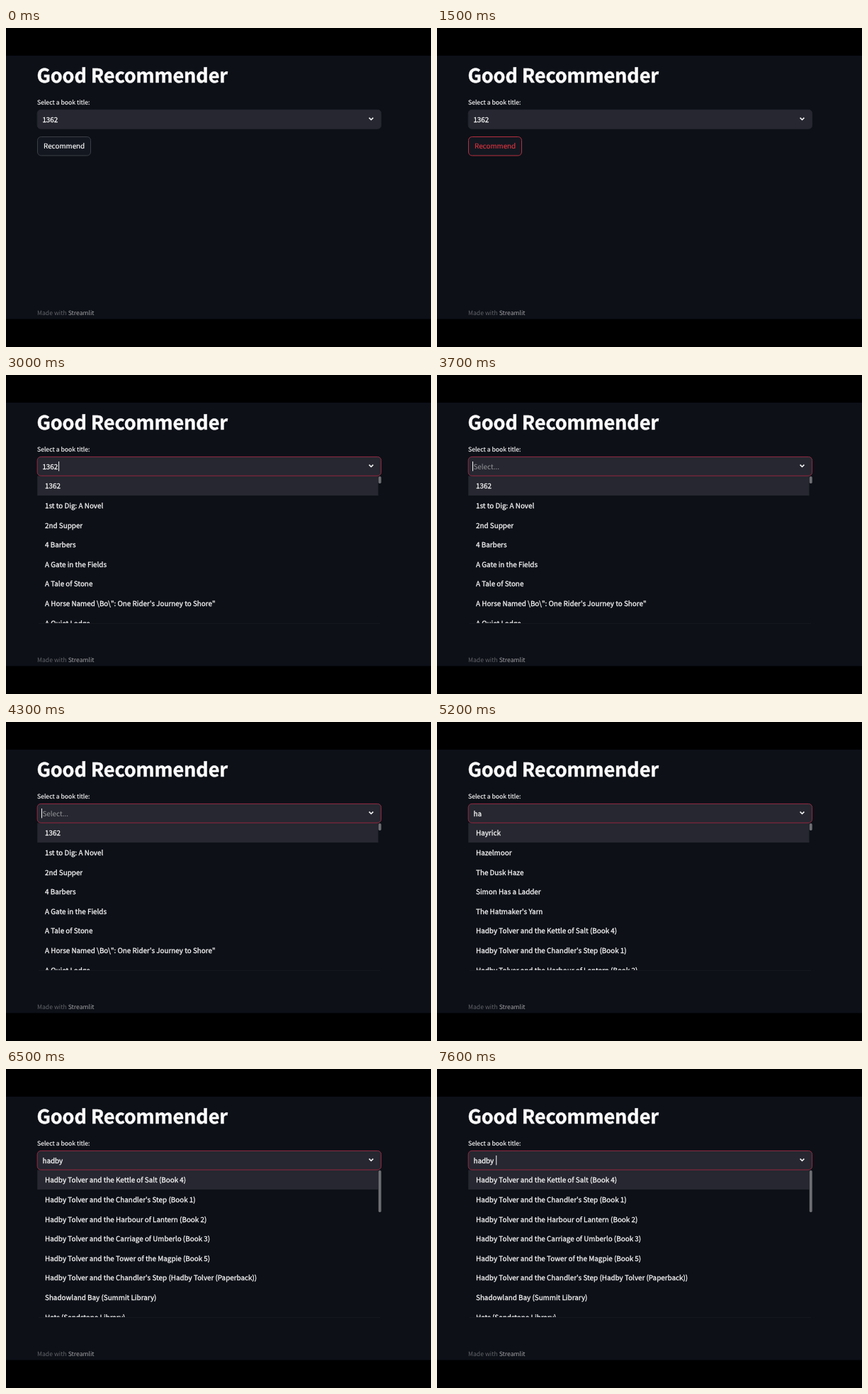
Write an HTML page that moves like this. It is 600 px wide and 450 px high and loops after 8000 ms.

```html
<!DOCTYPE html>
<html lang="en">
<head>
<meta charset="utf-8">
<title>Good Recommender</title>
<style>
  html, body { margin: 0; width: 100%; height: 100%; overflow: hidden; background: #000; }
  svg { display: block; width: 600px; height: 450px; }
  text {
    font: 400 9.87px "Noto Sans CJK JP", "Noto Sans CJK SC", "Noto Sans", sans-serif;
    fill: #fafafa; white-space: pre; text-rendering: geometricPrecision;
  }
  .title { font-size: 27.1px; font-weight: 700; letter-spacing: -.005em; stroke: #fafafa; stroke-width: .5px; }
  .small { font-size: 8.65px; }
  .strong { stroke: #fafafa; stroke-width: .28px; }
</style>
</head>
<body>
<svg viewBox="0 0 600 450">
  <defs><clipPath id="listClip"><rect x="44" y="142.5" width="486" height="207.5"/></clipPath></defs>
  <rect width="600" height="450" fill="#000"/>
  <rect y="39" width="600" height="371.5" fill="#0d1017"/>

  <g id="anchor" fill="none" stroke="#c8c9cc" stroke-width="1.2" stroke-linecap="round">
    <path d="M24 67a2.6 2.6 0 0 0 3.7 0l1.8-1.8a2.6 2.6 0 0 0-3.7-3.7l-.9.9"/>
    <path d="M26.2 65a2.6 2.6 0 0 0-3.7 0l-1.8 1.8a2.6 2.6 0 0 0 3.7 3.7l.9-.9"/>
  </g>
  <text class="title" x="43.5" y="77">Good Recommender</text>
  <text class="small" x="44" y="107.5" stroke="#fafafa" stroke-width=".15">Select a book title:</text>

  <rect id="button" x="44.5" y="153.5" width="75" height="26.5" rx="5" fill="#131720"/>
  <text id="buttonText" x="53" y="170.3" stroke-width=".2">Recommend</text>
  <text class="small" x="44" y="404.7" style="fill:#626469">Made with <tspan fill="#a2a3a6">Streamlit</tspan></text>

  <g id="menu">
    <rect x="44" y="142" width="486" fill="#0d1017" id="menuBack"/>
    <rect id="menuEdge" x="46" y="350" width="482" height="1" fill="#14171e"/>
    <g clip-path="url(#listClip)">
      <rect x="44.2" y="142" width="481.3" height="28.1" fill="#262730"/>
      <g id="items"></g>
      <rect id="thumb" x="525.8" y="143" width="3.9" rx="1.7" fill="#6d6e73"/>
    </g>
  </g>

  <rect id="field" x="44.2" y="115.4" width="485.4" height="26.8" rx="5" fill="#262730"/>
  <text id="value" x="51.4" y="132.7"></text>
  <rect id="caret" y="122" width="1" height="13.5" fill="#fafafa"/>
  <path d="M512.6 126.6l2.9 2.9 2.9-2.9" fill="none" stroke="#fafafa" stroke-width="1.5"/>
</svg>
<script>
const LOOP = 8000, ROW = 27.6;
const el = id => document.getElementById(id);
const set = (id, attrs) => {
  for (const name in attrs) el(id).setAttribute(name, attrs[name]);
};

const hero = 'Hadby Tolver';
const series = ['Kettle of Salt (Book 4)', "Chandler's Step (Book 1)", 'Harbour of Lantern (Book 2)',
  'Carriage of Umberlo (Book 3)', 'Tower of the Magpie (Book 5)',
  `Chandler's Step (${hero} (Paperback))`].map(name => `${hero} and the ${name}`);

const lists = {
  all: ['1362', '1st to Dig: A Novel', '2nd Supper', '4 Barbers', 'A Gate in the Fields', 'A Tale of Stone',
    'A Horse Named \\Bo\\": One Rider\'s Journey to Shore"', 'A Quiet Lodge'],
  year: ['1362'],
  h: ['Hayrick', 'Hedgerows', 'Hazelmoor', 'The Dusk Haze', 'Simon Has a Lantern', "The Hatmaker's Yarn",
    'Half a Mile of Heather', 'The Lighthouse Shelf'],
  ha: ['Hayrick', 'Hazelmoor', 'The Dusk Haze', 'Simon Has a Ladder', "The Hatmaker's Yarn", ...series.slice(0, 3)],
  had: [...series, 'Shadowland Bay (Summit Library)', 'Shade Orchard'],
  hadby: [...series, 'Shadowland Bay (Summit Library)', 'Hats (Sandstone Library)'],
};

// Each step: start time, typed value, list shown, scroll thumb height
const steps = [
  [0, '1362', null, 0],
  [2000, '1362', 'all', 10],
  [3200, '136', 'year', 0],
  [3700, '', 'all', 10],
  [4600, 'h', 'h', 10],
  [5000, 'ha', 'ha', 10],
  [5700, 'had', 'had', 10],
  [5900, 'hadb', 'hadby', 59],
  [6000, 'hadby', 'hadby', 59],
  [6600, 'hadby ', 'hadby', 59],
];
const caretOn = [[2000, 2500], [3000, 3500], [3700, 3800], [4300, 5200], [5700, 6500], [6600, 7100], [7600, LOOP]];
const anchorFade = [0, .25, .5, .25];

let shownStep;

function showStep(step) {
  if (step === shownStep) return;
  shownStep = step;
  const [, value, listName, thumb] = step;
  const text = el('value');
  text.textContent = value || 'Select...';
  text.setAttribute('class', value ? 'strong' : '');
  text.style.fill = value ? '' : '#96979b';

  const list = lists[listName] || [];
  el('items').replaceChildren(...list.map((label, i) => {
    const item = document.createElementNS('http://www.w3.org/2000/svg', 'text');
    item.setAttribute('class', 'strong');
    item.setAttribute('x', 55);
    item.setAttribute('y', 160.3 + i * ROW);
    item.textContent = label;
    return item;
  }));
  set('menuBack', { height: Math.min(208, list.length * ROW + 1) });
  set('menuEdge', { opacity: list.length > 7 ? 1 : 0 });
  set('thumb', { height: thumb });
  set('caret', { x: value ? 52.2 + text.getComputedTextLength() : 50 });
}

function draw(time) {
  const t = Math.floor(time / 100) * 100;
  showStep(steps.findLast(step => step[0] <= t));

  const open = t >= 2000;
  const hover = t === 1500;
  set('anchor', { opacity: anchorFade[t / 100] || 0 });
  set('button', { stroke: hover ? '#b5303f' : '#3b3e46' });
  el('buttonText').style.fill = hover ? '#d2343f' : '';
  set('buttonText', { stroke: hover ? '#d2343f' : '#fafafa' });
  set('field', { stroke: open ? '#942b42' : '#262730' });
  set('menu', { opacity: Math.max(0, Math.min(1, (t - 1900) / 300)) });
  set('caret', { opacity: caretOn.some(([from, to]) => t >= from && t < to) ? 1 : 0 });
}

const start = performance.now();
function tick() {
  draw((performance.now() - start) % LOOP);
  requestAnimationFrame(tick);
}
tick();
</script>
</body>
</html>
```
